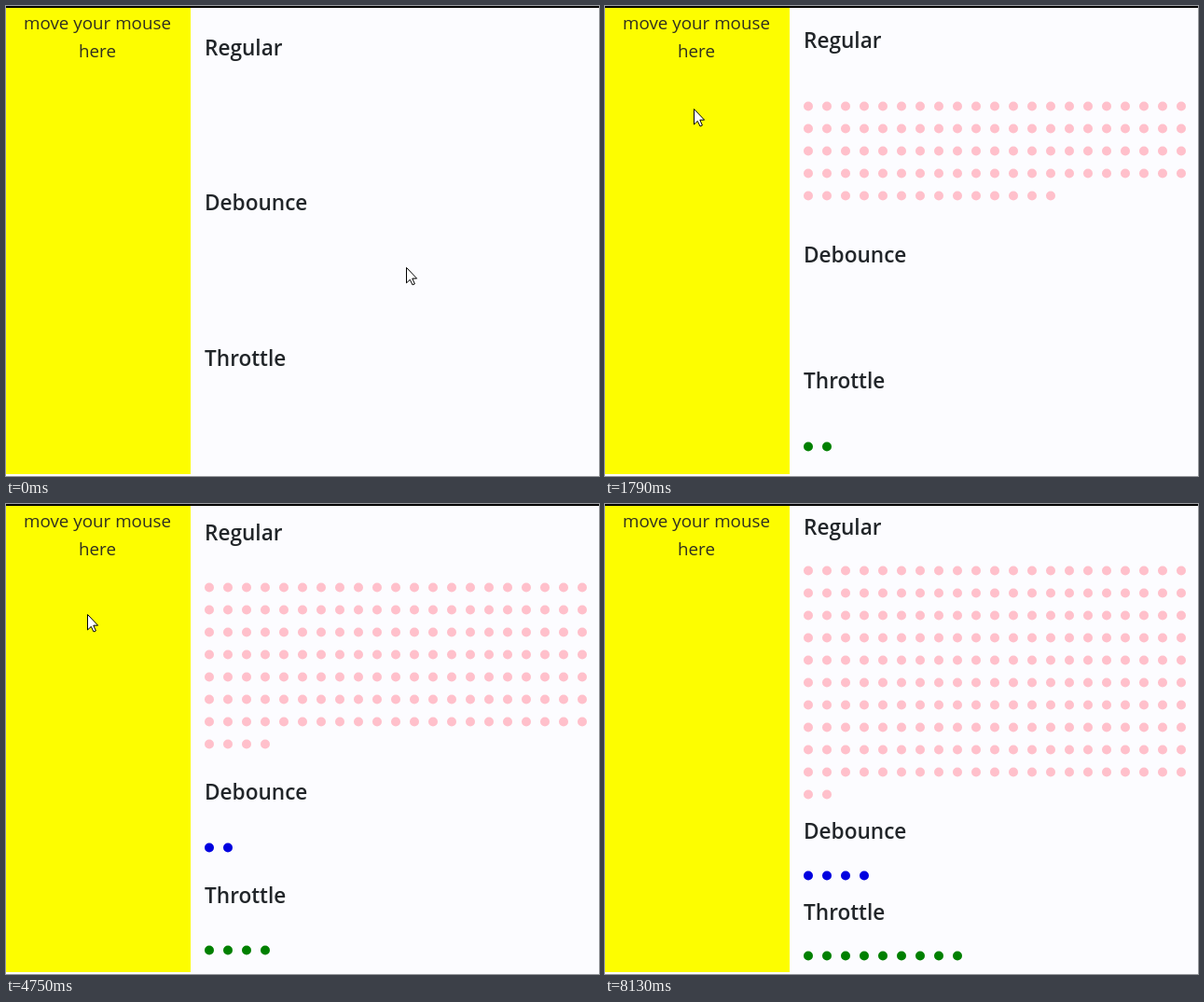
Recreate the animation shown at these times as an HTML page. Size 636 by 504 pixels, loop 8180 ms.

```html
<!DOCTYPE html>
<html lang="en">
<head>
<meta charset="utf-8">
<title>Regular, debounce, throttle</title>
<style>
  html, body { margin: 0; width: 100%; height: 100%; overflow: hidden; background: #fcfcff; }
  svg { display: block; width: 100%; height: 100%; }
  text { font-family: "Open Sans", "Noto Sans", sans-serif; }
  .hint { font-size: 18.8px; fill: #303020; text-anchor: middle; }
  .heading { font-size: 22.6px; font-weight: 600; fill: #212529; }
  .dots { fill: none; stroke-width: 10; stroke-linecap: round; }
</style>
</head>
<body>
<svg viewBox="0 0 636 504">
  <rect width="636" height="504" fill="#fcfcff"/>
  <rect y="2" width="198" height="500" fill="#fdfd00"/>
  <rect width="636" height="2" fill="#000"/>
  <text class="hint" x="98" y="25">move your mouse</text>
  <text class="hint" x="98" y="55">here</text>
  <g id="sections"></g>
  <path id="cursor" d="M.5 .5V17L4.3 13.4L7 19L9.4 18L6.8 12.2H11.6Z" fill="#fff" stroke="#000"/>
</svg>
<script>
// Times below are in ticks of 1/24 s.
const LOOP = 8180, FPS = 24, PER_ROW = 21;
const EVENTS_PER_TICK = 2.72, DEBOUNCE_WAIT = 13, THROTTLE_WAIT = 14.4;

// Start and end of each stretch of mouse movement over the yellow panel
const bursts = [
  [6.62, 44], [65, 70.3], [101.14, 120], [121.14, 133], [149, 150], [156, 159.7]
];

const mouseEvents = tick => EVENTS_PER_TICK * bursts.reduce(
  (sum, [start, end]) => sum + Math.max(0, Math.min(tick, end) - start), 0);

// Debounce fires once the mouse has rested for the full wait.
const debounceTicks = bursts
  .filter(([, end], i) => !bursts[i + 1] || bursts[i + 1][0] - end > DEBOUNCE_WAIT)
  .map(([, end]) => end + DEBOUNCE_WAIT);

// Throttle fires at the end of every wait in which the mouse moved.
const throttleTicks = bursts.flatMap(([start, end]) =>
  Array.from({ length: Math.ceil((end - start) / THROTTLE_WAIT) },
    (_, i) => start + (i + 1) * THROTTLE_WAIT));

const fired = (ticks, tick) => ticks.filter(t => t <= tick).length;

// heading and dots: [y with one row of regular dots, shift per further row]
const sections = [
  { name: "Regular", color: "#ffc0cb", heading: [53, -2], dots: [131.5, -6],
    count: tick => Math.floor(mouseEvents(tick)) },
  { name: "Debounce", color: "#0000e0", heading: [219, 14], dots: [298.5, 10],
    count: tick => fired(debounceTicks, tick) },
  { name: "Throttle", color: "#008000", heading: [386, 6], dots: [464.5, 2],
    count: tick => fired(throttleTicks, tick) }
];

// The cursor glides in, sways as it moves, and leaves to the left.
function cursorPosition(tick) {
  const moved = mouseEvents(tick);
  const sway = Math.sin(0.069 * moved - 4.3);
  const age = Math.max(0, tick - 4);
  const leaving = Math.max(0, tick - bursts[bursts.length - 1][0]);
  return [
    89 + 10 * sway + 331 * Math.exp(-0.173 * age) - 30 * leaving,
    101 + 0.11 * moved - 3.5 * sway + 182 * Math.exp(-0.3 * age)
  ];
}

function add(tag, attributes) {
  const node = document.createElementNS("http://www.w3.org/2000/svg", tag);
  for (const name in attributes) node.setAttribute(name, attributes[name]);
  return document.getElementById("sections").appendChild(node);
}

for (const section of sections) {
  section.title = add("text", { class: "heading", x: 213 });
  section.title.textContent = section.name;
  section.path = add("path", { class: "dots", stroke: section.color });
}

function dotPath(count, top) {
  return Array.from({ length: count }, (_, i) =>
    `M${218 + i % PER_ROW * 20} ${top + Math.floor(i / PER_ROW) * 24}h0`).join("");
}

const cursor = document.getElementById("cursor");

function draw(now) {
  const tick = Math.floor((now % LOOP + 5) * FPS / 1000);
  const extraRows = Math.max(1, Math.ceil(sections[0].count(tick) / PER_ROW)) - 1;
  for (const { title, path, heading, dots, count } of sections) {
    title.setAttribute("y", heading[0] + heading[1] * extraRows);
    path.setAttribute("d", dotPath(count(tick), dots[0] + dots[1] * extraRows));
  }
  const [x, y] = cursorPosition(tick).map(Math.round);
  cursor.setAttribute("transform", `translate(${x} ${y})`);
}

let start;
function frame(now) {
  start ??= now;
  draw(now - start);
  requestAnimationFrame(frame);
}
draw(0);
requestAnimationFrame(frame);
</script>
</body>
</html>
```
